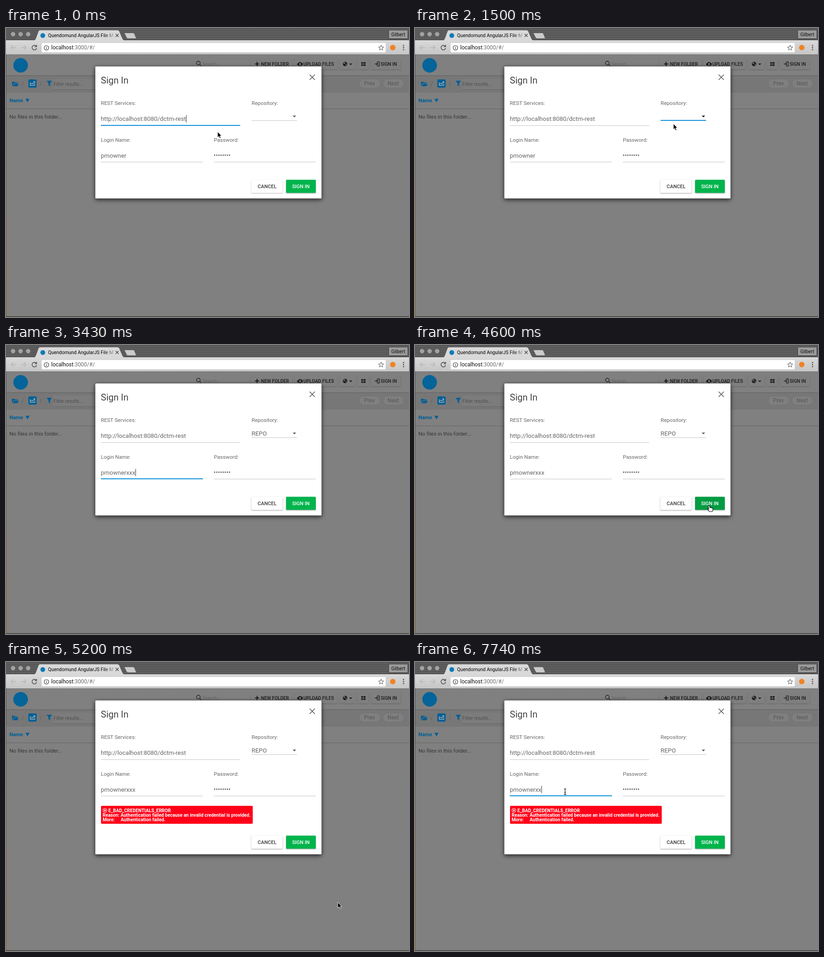
Recreate the animation shown at these times as an HTML page. Size 882 by 635 pixels, loop 8000 ms.

```html
<!DOCTYPE html>
<html lang="en">
<head>
<meta charset="utf-8">
<title>Sign in</title>
<style>
html, body { margin: 0; width: 100%; height: 100%; overflow: hidden; background: #808080; }
svg { display: block; width: 100%; height: 100%; font-family: Roboto, Arial, sans-serif; }
text { white-space: pre; }
.label { font-size: 11.6px; fill: #666; }
.value { font-size: 13.33px; fill: #646464; }
.btn { font-size: 10.9px; font-weight: 500; text-anchor: middle; }
.menu { font-size: 10.15px; font-weight: 500; fill: #1c1c1c; }
.pill { font-size: 12px; fill: #575757; text-anchor: middle; }
.err { font-size: 10.1px; font-weight: 700; fill: #fff; }
.line { fill: none; stroke: #222; stroke-width: 1.4; }
#panel { filter: drop-shadow(0 3px 5px rgba(0,0,0,.5)) drop-shadow(0 1px 3px rgba(0,0,0,.35)); }
#cancelBox, #okBox { filter: drop-shadow(0 1px 1.2px rgba(0,0,0,.4)); }
#list { filter: drop-shadow(0 2px 3px rgba(0,0,0,.35)); }
#tools rect { filter: drop-shadow(0 1px 1px rgba(0,0,0,.22)); }
</style>
</head>
<body>
<svg viewBox="0 0 882 635" preserveAspectRatio="none">
  <defs>
    <pattern id="weave" width="4" height="4" patternUnits="userSpaceOnUse">
      <rect width="4" height="4" fill="#5d5d5d"/>
      <path d="M0 0L2 2M2 2L4 0" stroke="#484848"/>
      <path d="M0 4L2 2M2 2L4 4" stroke="#6f6f6f" stroke-width=".8"/>
    </pattern>
    <linearGradient id="bar" x2="0" y2="1"><stop stop-color="#d9d9d9"/><stop offset="1" stop-color="#c6c6c6"/></linearGradient>
    <linearGradient id="fade"><stop offset=".86" stop-color="#000"/><stop offset="1" stop-color="#000" stop-opacity=".2"/></linearGradient>
    <linearGradient id="edge" x2="0" y2="1"><stop stop-color="#555"/><stop offset=".4" stop-color="#6e5a35"/><stop offset="1" stop-color="#8a6200"/></linearGradient>
  </defs>

  <!-- browser -->
  <rect width="882" height="635" fill="#808080"/>
  <rect width="882" height="28" fill="url(#weave)"/>
  <g fill="#a2a2a2"><circle cx="15.5" cy="13.5" r="4.8"/><circle cx="32" cy="13.5" r="4.8"/><circle cx="48.5" cy="13.5" r="4.8"/></g>
  <rect y="27" width="882" height="31" fill="url(#bar)"/>
  <path d="M61 28Q64 27 66 22L71 8Q72 5 75 5H244Q247 5 248 8L254 22Q256 27 260 28Z" fill="#d9d9d9"/>
  <path d="M259 11H278Q280 11 281 13L285 23H267Q265 23 264 21Z" fill="#cbcbcb" stroke="#666" stroke-width=".6"/>
  <circle cx="80.5" cy="16.5" r="5.2" fill="#0b7cb8"/>
  <text x="92" y="20" font-size="10.4" fill="url(#fade)">Quendomund AngularJS File M</text>
  <path d="M240 13L246.500 19.500M246.500 13L240 19.500" stroke="#444" stroke-width="1.3"/>
  <rect x="837.500" y="4.500" width="42" height="19" rx="2" fill="#999" stroke="#383838"/>
  <text x="858.500" y="17.500" font-size="10.300" text-anchor="middle" fill="#111">Gilbert</text>
  <g fill="none" stroke="#b6b6b6" stroke-width="1.5"><path d="M22 43H11M16 38L11 43L16 48"/><path d="M33 43H44M39 38L44 43L39 48"/></g>
  <path d="M66 40A5 5 0 1 0 67 44M67 37V41H63" fill="none" stroke="#555" stroke-width="1.600"/>
  <rect x="78" y="33" width="753" height="20.500" rx="2" fill="#fff"/>
  <circle cx="88.500" cy="43.500" r="5" fill="none" stroke="#444" stroke-width="1.200"/>
  <path d="M88.500 42.500V46.500M88.500 40.300V41.500" stroke="#444" stroke-width="1.300"/>
  <text x="99" y="47" font-size="11.900" fill="#111">localhost<tspan fill="#6b6b6b">:3000/#/</tspan></text>
  <path d="M821 37.500L822.500 41.700L826.800 41.800L823.400 44.500L824.600 48.600L821 46.200L817.400 48.600L818.600 44.500L815.200 41.800L819.500 41.700Z" fill="none" stroke="#555"/>
  <circle cx="846.500" cy="43" r="6" fill="#ef8324"/>
  <g fill="#555"><circle cx="870" cy="38.500" r="1.400"/><circle cx="870" cy="43" r="1.400"/><circle cx="870" cy="47.500" r="1.400"/></g>

  <!-- dimmed page -->
  <rect y="58" width="882" height="1" fill="#737373"/>
  <circle cx="32" cy="82" r="16" fill="#056499"/>
  <circle cx="421" cy="77" r="4" class="line"/><path d="M424 80L427.500 83.500" class="line" stroke-width="2"/>
  <text x="430" y="83" font-size="10.300" fill="#666">Search...</text>
  <g id="tools" fill="#7f7f7f">
    <rect x="535" y="68" width="92" height="23" rx="2"/><rect x="632" y="68" width="93" height="23" rx="2"/>
    <rect x="730" y="68" width="35" height="23" rx="2"/><rect x="770" y="68" width="24" height="23" rx="2"/><rect x="799" y="68" width="65" height="23" rx="2"/>
  </g>
  <path d="M545 79H554M549.500 74.500V83.500" stroke="#1c1c1c" stroke-width="2.200"/>
  <text class="menu" x="558" y="83">NEW FOLDER</text>
  <path d="M640 82.500A2.700 2.700 0 0 1 640 77A3.600 3.600 0 0 1 646 76A3.300 3.300 0 0 1 647 82.500H645V79.500H647L643.500 76.500L640.500 79.500H642.500V84.500H645V82.500Z" fill="#1c1c1c"/>
  <text class="menu" x="651" y="83">UPLOAD FILES</text>
  <circle cx="742" cy="79" r="4.800" fill="#1c1c1c"/><path d="M740 75L743 77L741 79L738 78ZM743 80L746 79L744 83Z" fill="#777"/>
  <path d="M751 78H758L754.500 81.500Z" fill="#1c1c1c"/>
  <path d="M777.500 75H781.500V78.500H777.500ZM782.500 75H787V78.500H782.500ZM777.500 79.700H781.500V83.200H777.500ZM782.500 79.700H787V83.200H782.500Z" fill="#1c1c1c"/>
  <path d="M807 79H813M811 76L814 79L811 82M812 74.500H817V83.500H812" class="line"/>
  <text class="menu" x="820" y="83">SIGN IN</text>

  <rect y="105" width="882" height="37" fill="#777"/>
  <rect y="104" width="882" height="1.500" fill="#686868"/>
  <path d="M13 127V118H18L19.500 119.500H25V121.500H17L13.500 127ZM14.500 128L18 122.500H28L25 128Z" fill="#005f95"/>
  <g font-size="12" fill="#606060"><text x="34" y="127">/</text><text x="74" y="127">/</text></g>
  <rect x="49" y="113" width="18" height="18" rx="2.500" fill="#005f95"/>
  <path d="M53 119V126H63V122M53 124L57 121L59 123L63 118M60 118H63V121" fill="none" stroke="#a5b2ba" stroke-width="1.300"/>
  <path d="M89 116H100.500L96.500 121.500V128L93 125.500V121.500Z" fill="#005f95"/>
  <rect x="103" y="111" width="94" height="24" fill="#7c7c7c"/><rect x="103" y="135" width="94" height="1" fill="#656565"/>
  <text x="104" y="127" font-size="10.200" fill="#505050">Filter results...</text>
  <g fill="#7f7f7f" stroke="#707070" stroke-width=".8"><rect x="773" y="112" width="46" height="20" rx="10"/><rect x="825" y="112" width="46" height="20" rx="10"/></g>
  <text class="pill" x="795.500" y="126">Prev</text><text class="pill" x="847.500" y="126">Next</text>
  <text x="7.500" y="163" font-size="11.300" font-weight="700" fill="#005f95">Name</text><path d="M42.500 155.500H51.500L47 163.500Z" fill="#005f95"/>
  <rect y="177" width="882" height="1.200" fill="#686868"/>
  <text x="7.500" y="199" font-size="11.700" fill="#333">No files in this folder...</text>
  <rect y="58" width="1" height="577" fill="url(#edge)"/>
  <rect y="633.500" width="882" height="1.500" fill="#403c34"/>

  <!-- dialog -->
  <rect id="panel" x="195.500" y="84.500" width="495" height="290" rx="1.500" fill="#fff"/>
  <text x="207.500" y="122" font-size="20" fill="#424242">Sign In</text>
  <path d="M664.500 102.500L676 114M676 102.500L664.500 114" stroke="#555" stroke-width="1.500"/>
  <text class="label" x="207.500" y="169">REST Services:</text>
  <text class="label" x="537.500" y="169">Repository:</text>
  <text class="label" x="207.500" y="249.500">Login Name:</text>
  <text class="label" x="455" y="249.500">Password:</text>
  <text class="value" id="url" x="207.500" y="204">http://localhost:8080/dctm-rest</text>
  <text class="value" id="login" x="207.500" y="284.500"></text>
  <text class="value" id="repo" x="537.500" y="198.500">REPO</text>
  <path d="M456.700 279.500H491" stroke="#555" stroke-width="2.800" stroke-linecap="round" stroke-dasharray="0 4.620"/>
  <path d="M627.500 192.500H635L631.250 196.200Z" id="tri"/>
  <rect id="urlLine" x="207.500" width="305" /><rect id="repoLine" x="537.500" width="99.500"/>
  <rect id="loginLine" x="207.500" width="223.500"/><rect x="455" y="294" width="223" height="1" fill="#c4c4c4"/>
  <rect id="caret" width="1" height="16" fill="#333"/>
  <g id="error">
    <rect x="208" y="316" width="332" height="39.500" rx="2" fill="#ff0018"/>
    <g class="err">
      <text x="224" y="330">E_BAD_CREDENTIALS_ERROR</text>
      <text x="211.500" y="340">Reason: Authentication failed because an invalid credential is provided.</text>
      <text x="211.500" y="350">More:</text><text x="251" y="350">Authentication failed.</text>
    </g>
    <path d="M214.800 324.300L218.200 327.700M218.200 324.300L214.800 327.700" stroke="#fff" stroke-width="1.300"/>
    <circle cx="216.500" cy="326" r="4.300" fill="none" stroke="#fff" stroke-width="1.100"/>
  </g>
  <g id="buttons">
    <rect id="cancelBox" x="537" y="333.500" width="68.500" height="29" rx="1.500" fill="#fff"/>
    <text class="btn" x="571.500" y="351.800" fill="#3a3a3a">CANCEL</text>
    <rect id="okBox" x="613" y="333.500" width="65" height="28.800" rx="1.500"/>
    <text class="btn" x="645.300" y="351.800" fill="#fff">SIGN IN</text>
  </g>
  <g id="list">
    <rect x="528" y="182.500" width="104" height="21.500" rx="3.500" fill="#efefef"/>
    <rect x="528" y="185" width="102.500" height="16.500" fill="#a1a1a1"/>
    <path d="M534 193L536.300 196L540 188.500" fill="none" stroke="#fff" stroke-width="1.500"/>
  </g>

  <!-- pointers -->
  <g id="pointer">
    <path id="arrow" d="M0 0V12.500L2.900 9.900L4.900 14.400L7.200 13.400L5.200 9.100H9Z" fill="#000" stroke="#fff" stroke-width=".9"/>
    <path id="beam" d="M-2.500 -6.500Q0 -6.500 0 -4.500Q0 -6.500 2.500 -6.500M0 -4.500V4.500M-1.500 1.500H1.500M-2.500 6.500Q0 6.500 0 4.500Q0 6.500 2.500 6.500" fill="none" stroke="#111" stroke-width="1.200"/>
    <path id="hand" d="M-3 0Q-1.300 -1.500 -.5 .5L.5 4.500Q2 3.200 3 4.700Q4.500 3.700 5.300 5.300Q7 4.700 7 7V9Q7 11 5.500 13H-1Q-2 10.500 -4.500 8Q-5.500 6 -3.300 6.300L-2 7.500L-3.500 1.500Q-3.600 .5 -3 0Z" fill="#fff" stroke="#000" stroke-width="1.100"/>
  </g>
</svg>
<script>
const LOOP = 8000, STEP = 148.85, LEAD = 17;
const el = id => document.getElementById(id);
const show = (id, on) => el(id).setAttribute("visibility", on ? "visible" : "hidden");
const within = (k, a, b) => k >= a && k < b;
const attrs = (id, map) => { for (const name in map) el(id).setAttribute(name, map[name]); };

// step, x, y
const path = [
  [0, 463, 228], [1, 468, 228], [4, 548, 213], [6, 589, 199], [7, 591, 196], [9, 591, 196],
  [11, 540, 225], [14, 399, 291], [15, 340, 291], [16, 318, 285], [23, 318, 285],
  [25, 420, 318], [27, 615, 360], [28, 658, 366], [29, 651, 358], [30, 645, 353], [31, 645, 353],
  [32, 676, 425], [33, 727, 518], [34, 729, 535], [35, 726, 528], [36, 712, 500], [37, 668, 440],
  [38, 597, 367], [40, 455, 312], [42, 342, 287], [43, 323, 284], [44, 327, 285], [47, 328.5, 285]
];

function along(k) {
  const i = path.findIndex(p => p[0] >= k);
  if (i < 0) return path[path.length - 1].slice(1);
  if (i === 0) return path[0].slice(1);
  const [a, x0, y0] = path[i - 1], [b, x1, y1] = path[i];
  const u = (k - a) / (b - a);
  return [x0 + (x1 - x0) * u, y0 + (y1 - y0) * u];
}

function underline(id, y, focused) {
  attrs(id, { y: focused ? y - 1 : y, height: focused ? 2 : 1, fill: focused ? "#0b90d8" : "#c4c4c4" });
}

function drawFields(k) {
  const extra = k < 20 ? 0 : k < 21 ? 1 : k < 23 ? 2 : k < 52 ? 3 : 2;
  el("login").textContent = "pmowner" + "x".repeat(extra);
  const loginFocus = within(k, 17, 30) || k >= 45;
  underline("urlLine", 214, k < 9);
  underline("repoLine", 203, within(k, 7, 17));
  underline("loginLine", 294, loginFocus);
  el("tri").setAttribute("fill", within(k, 7, 17) ? "#111" : "#555");
  show("repo", k >= 18);
  show("list", within(k, 7, 9));

  const urlCaret = k < 3 || k === 6;
  const loginCaret = within(k, 17, 26) || within(k, 45, 47) || k >= 50;
  const field = el(urlCaret ? "url" : "login");
  show("caret", urlCaret || loginCaret);
  attrs("caret", { x: 207.7 + field.getComputedTextLength(), y: urlCaret ? 191.5 : 272 });
}

function drawDialog(k) {
  const grow = k >= 32 ? 48 : 0;
  el("panel").setAttribute("height", 290 + grow);
  el("buttons").setAttribute("transform", `translate(0 ${grow})`);
  el("error").setAttribute("opacity", Math.max(0, Math.min(1, 0.51 + (k - 33) * 0.35)));
  const hover = within(k, 28, 32) ? 1 : k === 32 ? 0.7 : k === 33 ? 0.35 : 0;
  el("okBox").setAttribute("fill", `rgb(0,${180 - 24 * hover},${76 - 10 * hover})`);
  el("cancelBox").setAttribute("opacity", k < 1 ? 0.75 : 1);
}

function drawPointer(k) {
  const [x, y] = along(k);
  const beam = within(k, 15, 20) || k >= 42, hand = within(k, 28, 32);
  const seen = !within(k, 20, 24);
  el("pointer").setAttribute("transform", `translate(${x} ${y})`);
  show("beam", seen && beam);
  show("hand", seen && hand);
  show("arrow", seen && !beam && !hand);
}

function frame(now) {
  const k = Math.floor((now % LOOP + LEAD) / STEP);
  drawFields(k);
  drawDialog(k);
  drawPointer(k);
  requestAnimationFrame(frame);
}
frame(0);
</script>
</body>
</html>
```
